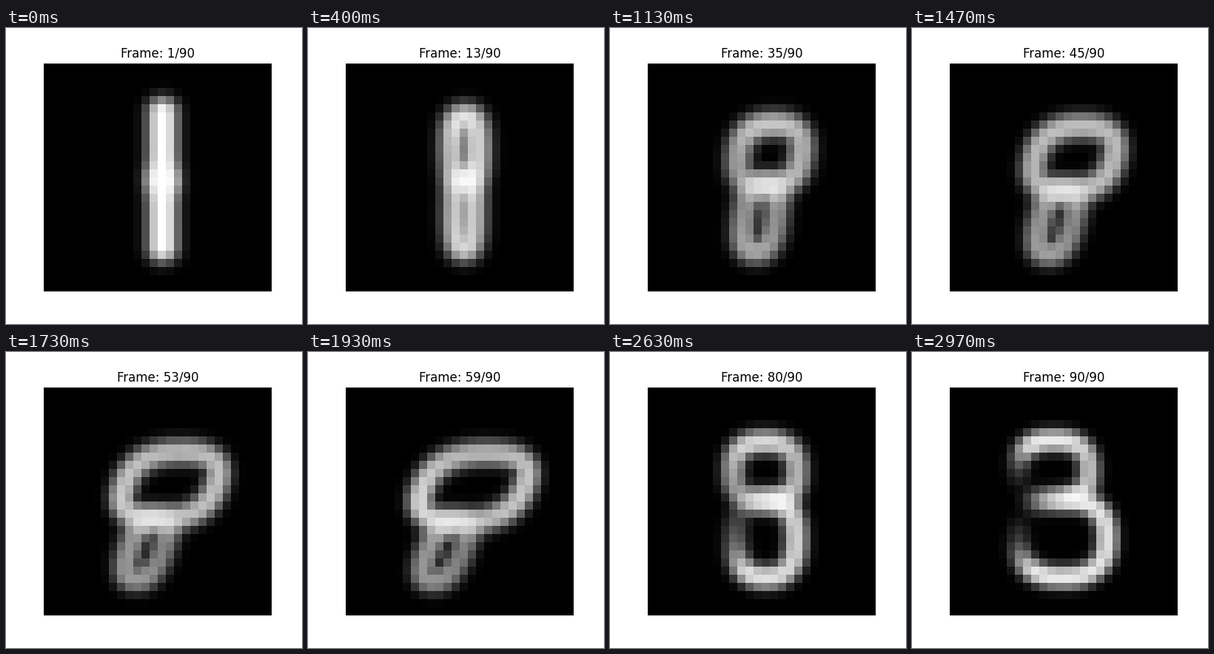
A matplotlib script that plays this animation: 400 by 400 pixels, repeating every 3000 ms.

```python
import numpy as np
import matplotlib.pyplot as plt
from matplotlib.animation import FuncAnimation

SIZE = 28        # image side in cells
STEPS = 90       # morph steps per loop
TICKS = 300      # 10 ms ticks per loop

theta = np.linspace(0, 2 * np.pi, 96, endpoint=False)
rows, cols = np.mgrid[:SIZE, :SIZE]


def pose(step, heights, lean, width, upper, lower):
    """heights: top, waist, bottom; loops: x, radius, tones of cap, left, right."""
    return np.array([step, *heights, lean, width, *upper, *lower])


BAR = (14.1, 0, 1, 1, 1)
POSES = np.array([
    pose(0, (5.6, 13.8, 22), 0, 1.95, BAR, BAR),
    pose(23, (6.7, 13.8, 22.2), 0, 1.8,
         (14.2, 2.8, .8, .5, .65), (14, 1.9, .7, .55, .6)),
    pose(58, (7.6, 16, 23.2), .4, 1.65,
         (15.2, 6.2, .72, .85, .78), (11.7, 2.1, .58, .6, .5)),
    pose(79, (6.2, 13.4, 22.8), 0, 1.55,
         (13.9, 3.9, .85, .6, .7), (14, 3.7, .88, .25, .82)),
    pose(89, (6, 13.3, 22.8), 0, 1.45,
         (12.3, 4.3, .92, .05, .75), (13.4, 5.4, .92, .05, .88)),
])


def rounded(v):
    """Swell a sine or cosine so that the loop is a little square."""
    return np.sign(v) * np.abs(v) ** 0.8


def loop_image(x, radius, cap, left, right, outer, waist, lean, width):
    mid, half = (outer + waist) / 2, (waist - outer) / 2
    dy = half * rounded(np.sin(theta))
    px = x + radius * rounded(np.cos(theta)) - lean * dy
    # the left tone is centred a little towards the waist
    to_left = np.clip(-np.cos(theta + np.pi / 6), 0, 1) ** 1.5
    to_right = np.clip(np.cos(theta), 0, 1) ** 2
    tone = cap + (left - cap) * to_left + (right - cap) * to_right
    px, py, tone = (v[:, None, None] for v in (px, mid + dy, tone))
    dist = np.hypot(cols - px, rows - py)
    return (tone * np.exp(-(dist / width) ** 2.4)).max(axis=0)


def digit(step):
    top, waist, bottom, lean, width, *loops = (
        np.interp(step, POSES[:, 0], column) for column in POSES.T[1:])
    upper = loop_image(*loops[:5], top, waist, lean, width)
    lower = loop_image(*loops[5:], bottom, waist, lean, width)
    return 1 - (1 - upper) * (1 - lower)


digits = [digit(s) for s in range(STEPS)]

fig, ax = plt.subplots(figsize=(4, 4), dpi=100)
ax.axis("off")
image = ax.imshow(digits[0], cmap="gray", vmin=0, vmax=1)
title = ax.set_title("")


def update(tick):
    step = (tick * 3 + 1) // 10
    image.set_data(digits[step])
    title.set_text(f"Frame: {step + 1}/{STEPS}")
    return image, title


anim = FuncAnimation(fig, update, frames=TICKS, interval=10, repeat=True,
                     repeat_delay=0, blit=False)
plt.show()
```
